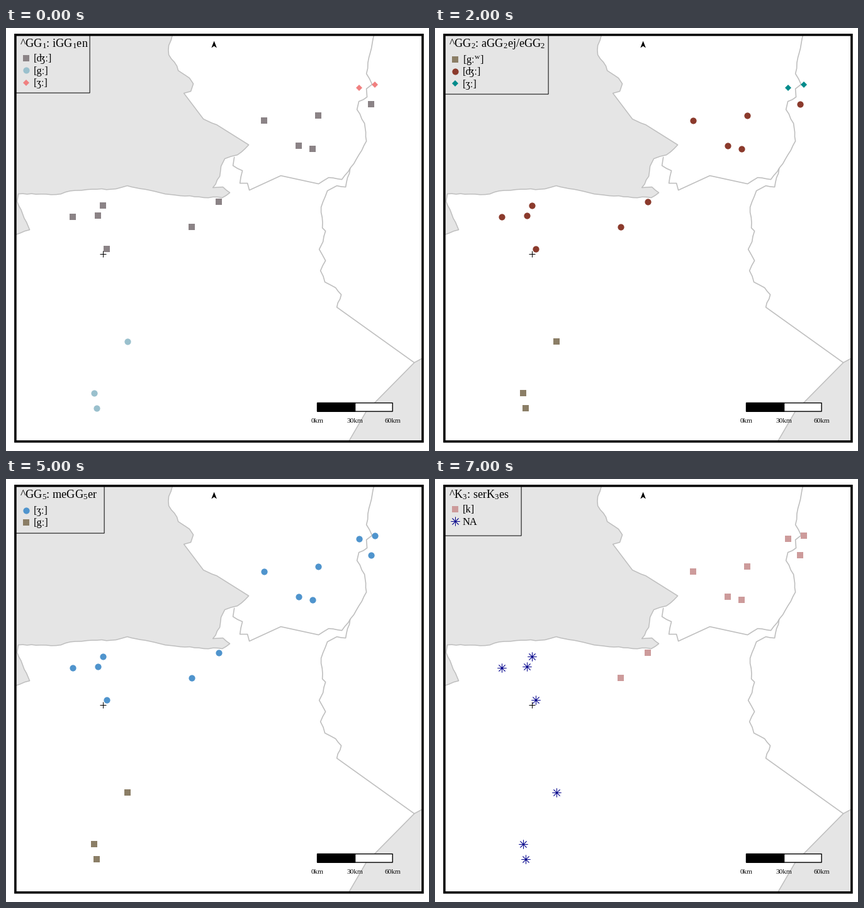
These frames come from a looping animation (672 by 672 pixels, 8 s). A matplotlib script:

```python
import math
import random

import matplotlib.pyplot as plt
from matplotlib.animation import FuncAnimation
from matplotlib.patches import Polygon, Rectangle

SIZE = 672
DPI = 72  # one point equals one pixel
SHIFT = 0.4
LAND, EDGE = "#e5e5e5", "#bebebe"

plt.rcParams.update({
    "font.family": ["Liberation Serif", "DejaVu Serif", "DejaVu Sans"],
    "mathtext.fontset": "custom",
    "mathtext.rm": "Liberation Serif",
    "mathtext.default": "rm",
})

EAST_COAST = [
    (265, 11), (259, 28), (259, 43), (272, 61), (274, 68), (292, 80),
    (298, 89), (294, 101), (283, 104), (314, 145), (335, 154), (386, 186),
    (368, 202), (348, 208), (342, 220), (340, 236), (329, 254),
]
SOUTH_COAST = [
    (345, 253), (356, 262), (344, 270), (300, 268.5), (262, 265), (228, 258),
    (193, 251), (175, 256), (130, 257), (110, 258.5), (80, 265), (48, 264.5),
    (20, 264), (18, 276), (33, 309), (38, 321), (15, 329), (15, 11),
]
NORTH_BORDER = [
    (363, 206), (361, 219), (376, 227), (372, 247), (384, 247), (387, 258),
    (437, 235), (497, 248), (513, 238), (534, 241), (553, 216), (573, 180),
    (570, 152), (558, 130), (561, 117), (574, 110), (573, 97), (582, 90),
    (573, 73), (577, 47), (585, 11),
]
EAST_BORDER = [
    (547, 224), (540, 253), (526, 251), (511, 259), (501, 285), (503, 318),
    (508, 323), (504, 340), (498, 352), (508, 370), (500, 386), (507, 404),
    (524, 413), (533, 424), (526, 444), (649, 532),
]
CORNER = [(649, 532), (662, 525), (662, 657), (545, 657), (573, 609)]

REGIONS = {
    "west": [(106.5, 300.5), (154, 282), (146.3, 298.5)],
    "town": [(160.8, 351.5)],
    "shore": [(295, 316.5), (338, 276.5)],
    "inland": [(410.7, 147)],
    "valley": [(465.7, 187.5), (487, 192)],
    "river": [(496, 139.5), (580, 121.5)],
    "east": [(561, 95), (586.7, 90)],
    "south": [(193, 498.3), (140, 580.3), (144.8, 604.7)],
}

# title, legend corner, first row, entries (shape, colour, sound, regions);
# an entry without regions takes all those left over
MAPS = [
    ("^GG$_1$: iGG$_1$en", (133.5, 103.5), 48.5,
     [("s", "#8b8386", "[ʤː]", ""), ("o", "#9ac0cd", "[gː]", "south"),
      ("D", "#f08080", "[ʒː]", "east")]),
    ("^GG$_1$: aGG$_1$ej", (141.5, 103.5), 48.5,
     [("o", "#cd6839", "[ʤː]", ""), ("s", "#4f94cd", "[gː]", "south"),
      ("D", "#8b8386", "[ʒː]", "east")]),
    ("^GG$_2$: aGG$_2$ej/eGG$_2$", (180.5, 105.5), 50,
     [("s", "#8b7e66", "[gː$^w$]", "south"), ("o", "#8b3a2c", "[ʤː]", ""),
      ("D", "#008b8b", "[ʒː]", "east")]),
    ("^GG$_5$: aGG$_5$ej/eGG$_5$#", (192.5, 124.5), 50,
     [("*", "#cd6839", "[gː($^w$)]", "south"),
      ("^", "#cd6839", "[dːeʒ]", "west town shore"),
      ("D", "#00c5cd", "[ʤː]", ""), ("o", "#a2b5cd", "[ʒː]", "east")]),
    ("^GG$_2$: (tt)meGG$_2$er", (177.5, 86.5), 50,
     [("s", "#cd7054", "[ʒː]", ""),
      ("o", "#cdaf95", "[ʤː]", "shore inland")]),
    ("^GG$_5$: meGG$_5$er", (156.5, 86.5), 50,
     [("o", "#4f94cd", "[ʒː]", ""), ("s", "#8b7e66", "[gː]", "south")]),
    ("^QQ$_1$: meQQ$_1$r/zQQ$_1$el", (220.5, 113.5), 50,
     [("o", "#cccccc", "[ʁː]", "west shore valley"),
      ("D", "#4f94cd", "[qː]", "river east"), ("*", "#00c5cd", "NA", "")]),
    ("^K$_3$: serK$_3$es", (137.5, 90.5), 48.5,
     [("s", "#cd9b9b", "[k]", ""),
      ("*", "#00008b", "NA", "west town south")]),
]

# marker, size, edge width, vertical shift
SHAPES = {
    "s": ("s", 9.6, 0, 0),
    "o": ("o", 10.2, 0, 0),
    "D": ("D", 6.8, 0, 0),
    "^": ("^", 12, 0, -1),
    "*": ((8, 2, 0), 14, 0.75, 0),
}

fig = plt.figure(figsize=(SIZE / DPI, SIZE / DPI), dpi=DPI, facecolor="white")
ax = fig.add_axes([0, 0, 1, 1])
ax.set(xlim=(SHIFT, SIZE + SHIFT), ylim=(SIZE + SHIFT, SHIFT))
ax.axis("off")


def rough(points, seed, amp=0.9, step=7, straight=48):
    """Roughen the short stretches of a line, keep the long ones straight."""
    rng = random.Random(seed)
    path = [points[0]]
    for (x0, y0), (x1, y1) in zip(points, points[1:]):
        dx, dy = x1 - x0, y1 - y0
        length = math.hypot(dx, dy)
        parts = max(1, int(length / step)) if length < straight else 1
        for k in range(1, parts):
            t, off = k / parts, rng.uniform(-amp, amp) / length
            path.append((x0 + dx * t - dy * off, y0 + dy * t + dx * off))
        path.append((x1, y1))
    return path


def box(x0, y0, x1, y1, fill="none", lw=1.0, z=4):
    return ax.add_patch(Rectangle((x0, y0), x1 - x0, y1 - y0, facecolor=fill,
                                  edgecolor="black", linewidth=lw, zorder=z,
                                  snap=False))


def label(x, y, text, size, **kw):
    return ax.text(x, y, text, fontsize=size, va="baseline", zorder=5, **kw)


def markers(points, shape, color):
    marker, size, width, shift = SHAPES[shape]
    xs, ys = zip(*points)
    return ax.plot(xs, [y + shift for y in ys], ls="none", marker=marker,
                   ms=size, mew=width, color=color, zorder=6, snap=False)[0]


def draw_base():
    for area in (rough(EAST_COAST + SOUTH_COAST, 1), CORNER):
        ax.add_patch(Polygon(area, facecolor=LAND, edgecolor=EDGE,
                             linewidth=1.5, joinstyle="round", zorder=1))
    for seed, border in enumerate((NORTH_BORDER, EAST_BORDER)):
        ax.plot(*zip(*rough(border, seed)), color=EDGE, lw=1.6, zorder=2,
                solid_joinstyle="round")
    ax.add_patch(Polygon([(331, 21), (335.3, 32), (331, 29), (326.7, 32)],
                         facecolor="black", edgecolor="none", zorder=4))
    ax.plot(154.8, 359, "+", ms=10.5, mew=1, color="black", zorder=4)
    box(495, 596, 614.5, 609.5, "white", lw=1.4)
    box(495, 596, 555, 609.5, "black", lw=1.4)
    for km in (0, 30, 60):
        label(495 + 2 * km, 627, f"{km}km", 11.4, ha="center")
    box(15.3, 11.3, 662.3, 657.3, lw=3.6, z=8)


def draw_map(title, corner, top, entries):
    artists = [box(15.5, 11, *corner), label(22.8, 30.8, title, 18.3)]
    named = " ".join(entry[-1] for entry in entries).split()
    rest = [name for name in REGIONS if name not in named]
    for i, (shape, color, sound, regions) in enumerate(entries):
        y = top + 19.3 * i
        sites = [p for name in regions.split() or rest for p in REGIONS[name]]
        artists.append(markers(sites + [(31.9, y)], shape, color))
        artists.append(label(44.2, y + 5.3, sound, 16.4))
    return artists


draw_base()
layers = [draw_map(*m) for m in MAPS]


def update(n):
    for i, layer in enumerate(layers):
        for artist in layer:
            artist.set_visible(i == n)
    return []


anim = FuncAnimation(fig, update, frames=len(MAPS), interval=1000,
                     init_func=lambda: update(0), repeat=True,
                     repeat_delay=0, blit=False)
plt.show()
```
